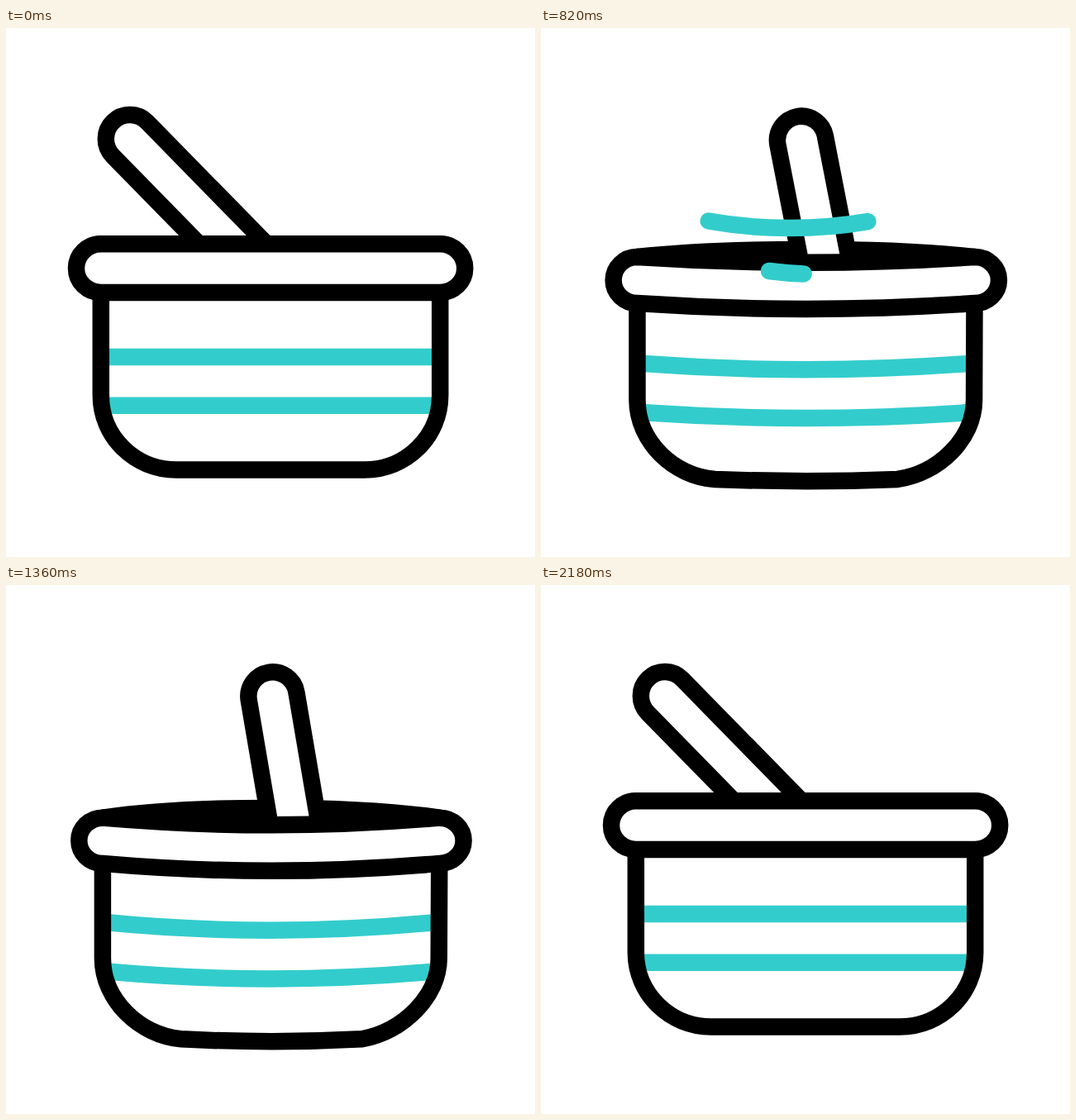
Animation of 640 by 640 pixels, one loop 2400 ms. Source, as an HTML page:

```html
<!DOCTYPE html>
<html lang="en">
<head>
<meta charset="utf-8">
<title>Mixing bowl</title>
<style>
  html, body { margin: 0; width: 100%; height: 100%; overflow: hidden; background: #fff; }
  svg { display: block; width: 100vw; height: 100vh; }
  path { fill: none; stroke: #000; stroke-width: 20.5; stroke-linejoin: round; }
  .solid { fill: #fff; }
  .teal { stroke: #3cc; }
  .round { stroke-linecap: round; }
</style>
</head>
<body>
<svg viewBox="0 0 640 640">
  <path id="back" class="round"/>
  <path id="pestle" class="solid" d="M-29.2 260V0A29.2 29.2 0 0 1 29.2 0V260"/>
  <path id="fill" class="solid" style="stroke:none"/>
  <path id="stripe1" class="teal"/>
  <path id="stripe2" class="teal"/>
  <path id="body" class="round"/>
  <path id="rim" class="solid"/>
  <path id="swoosh1" class="teal round" pathLength="1" d="M96 194C186 258 416 258 506 194"/>
  <path id="swoosh2" class="teal round" pathLength="1" d="M276 294Q365 306 447 277"/>
</svg>
<script>
const LOOP = 2400, ARM = 318;
const el = id => document.getElementById(id);
const draw = (id, d) => el(id).setAttribute('d', d);
const ramp = (t, a, b) => Math.min(1, Math.max(0, (t - a) / (b - a)));
const smooth = u => u * u * (3 - 2 * u);

// Eased value through [time, value] keys, held after the last one
function track(t, keys) {
  let v = keys[0][1];
  for (let i = 1; i < keys.length; i++) {
    const [a, from] = keys[i - 1], [b, to] = keys[i];
    if (t >= a) v = from + (to - from) * smooth(ramp(t, a, b));
  }
  return v;
}

// Symmetric arc from x1 to x2 at height y, reaching mid halfway;
// a smaller reach gives fuller shoulders
function sag(x1, x2, y, mid, reach = 1 / 3) {
  const h = (x2 - x1) * reach, cy = y + (mid - y) * 4 / 3;
  return `C${x1 + h} ${cy} ${x2 - h} ${cy} ${x2} ${y}`;
}

function drawBowl(k) {
  const l = 114.8 + 4 * k, r = 525.2 - 2.8 * k, rimR = 525.2 - 1.5 * k;
  const top = 261.3 + 38.5 * k, low = 320 + 32 * k, mid = (top + low) / 2;
  const left = 85 + 6.3 * k, right = 555.2 - 3.1 * k;
  const c = 0.552, h = (low - top) / 2 * c;
  const capL = l + (left - l) * c, capR = rimR + (right - rimR) * c;

  draw('back', `M${l} ${top}` + sag(l, rimR, top, 261.3 + 16.3 * k, 0.26));
  draw('rim', `M${l} ${top}` + sag(l, rimR, top, 261.3 + 55 * k) +
    `C${capR} ${top} ${right} ${mid - h} ${right} ${mid}` +
    `S${capR} ${low} ${rimR} ${low}` + sag(rimR, l, low, 320 + 48.8 * k) +
    `C${capL} ${low} ${left} ${mid + h} ${left} ${mid}` +
    `S${capL} ${top} ${l} ${top}Z`);

  const wall = 444.5 + 13.6 * k, floor = 534.5 + 28 * k;
  const bl = 206 + 11 * k, br = 434 - 6 * k;
  const shell = `M${l} ${low}V${wall}` +
    `C${l} ${wall + 50} ${bl - 50} ${floor - 8 * k} ${bl} ${floor}` +
    sag(bl, br, floor, 534.5 + 33.5 * k) +
    `C${br + 50} ${floor - 18 * k} ${r} ${wall + 50 - 8 * k} ${r} ${wall}L${r + k} ${low}`;
  draw('fill', shell);
  draw('body', shell);

  [398, 456.7].forEach((y, i) => {
    const a = l + 5 * i, b = r - 5 * i, end = y + (18.5 + 2 * i) * k;
    draw('stripe' + (i + 1), `M${a} ${end}` + sag(a, b, end, y + 37.3 * k));
  });
}

function drawPestle(t) {
  const angle = track(t, [[0, -44.4], [530, -53.6], [1105, 30], [1635, -53.6], [2180, -44.4]]);
  const drop = track(t, [[0, 0], [780, 1], [1620, 1], [2180, 0]]);
  const x = 372.5 + 3.5 * drop, y = 361.5 + 86.5 * drop;
  el('pestle').setAttribute('transform',
    `translate(${x} ${y}) rotate(${angle}) translate(0 ${-ARM})`);
}

function trim(id, tail, head) {
  const s = el(id).style;
  s.display = head > tail ? '' : 'none';
  s.strokeDasharray = `${head - tail} 2`;
  s.strokeDashoffset = -tail;
}

function frame(now) {
  const t = now % LOOP;
  drawBowl(track(t, [[0, 0], [515, 1], [1060, 0], [1640, 1], [2180, 0]]));
  drawPestle(t);
  trim('swoosh1', ramp(t, 700, 1150), ramp(t, 494, 947));
  trim('swoosh2', ramp(t, 870, 1235), ramp(t, 715, 1155));
  requestAnimationFrame(frame);
}

frame(0);
</script>
</body>
</html>
```
